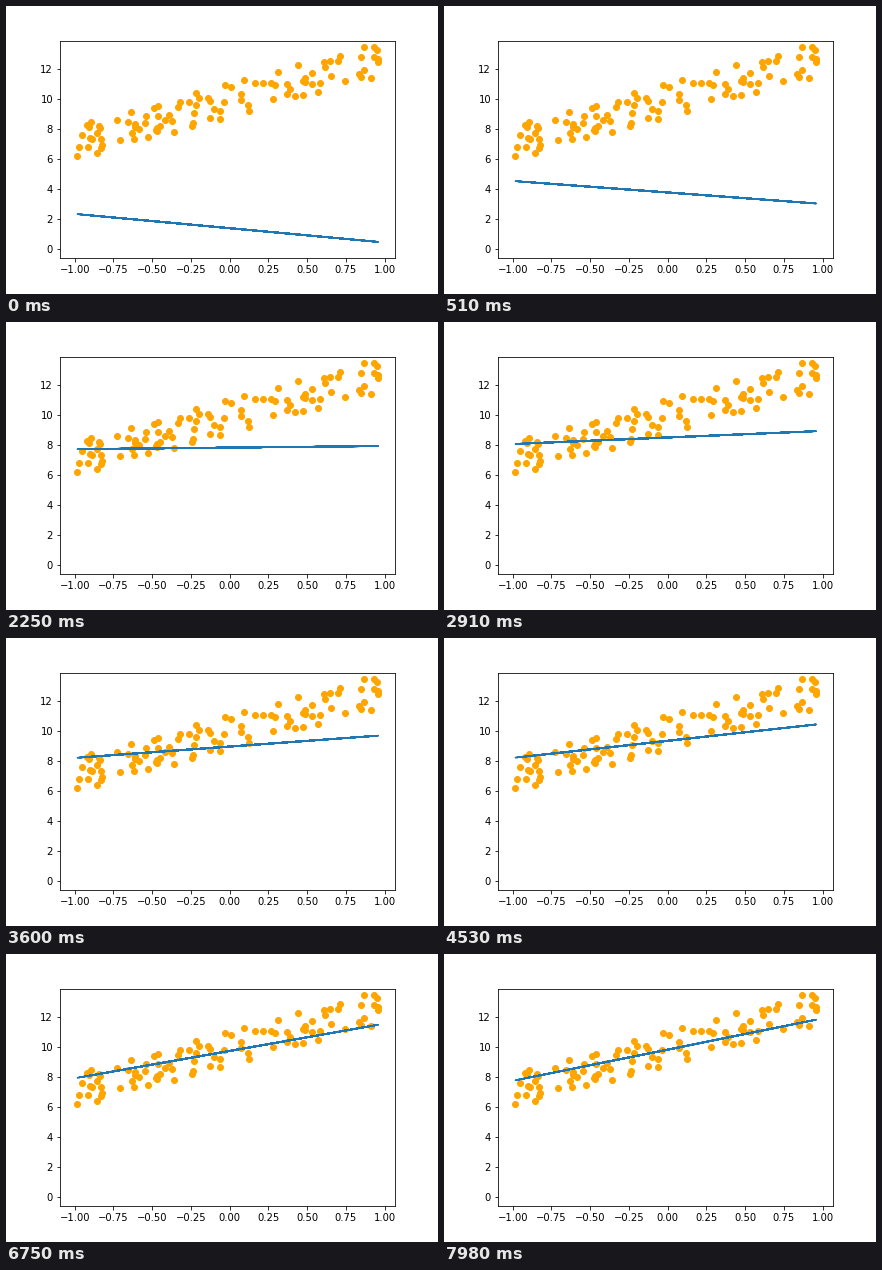
A matplotlib script that plays this animation: 432 px wide and 288 px high, repeating every 8 s.

```python
import numpy as np
import matplotlib.pyplot as plt
from matplotlib.animation import FuncAnimation

WIDTH, HEIGHT, DPI = 432, 288, 72
X0, Y0 = 223.7, 242.6        # stage position of the data origin
X_UNIT, Y_UNIT = 155, 15     # pixels per data unit
FRAMES, INTERVAL = 400, 20

# Clumps of samples along x: from, to, count
CLUMPS = [(-0.983, -0.824, 16), (-0.73, -0.198, 32), (-0.137, 0.01, 9),
          (0.07, 0.16, 6), (0.218, 0.747, 25), (0.837, 0.959, 11)]
SPREAD = 1.1

# Gradient descent on the mean squared error of y = w * x + b
RATE = 0.02
CURVATURE = np.array([[1, -0.11], [-0.11, 0.362]])
BEST = np.array([9.97, 2.9])
START = np.array([1.36, -0.953])


def make_samples(rng):
    """Noisy samples around a rising straight trend."""
    xs, noise = [], []
    for lo, hi, n in CLUMPS:
        xs += [lo, hi, *rng.uniform(lo, hi, n - 2)]
        noise += list(rng.permutation(np.linspace(-SPREAD, SPREAD, n)))
    xs = np.array(xs)
    return xs, 9.9 + 2.85 * xs + noise


def fit(step):
    """Bias and weight after a number of descent steps."""
    decay = np.linalg.matrix_power(np.eye(2) - RATE * CURVATURE, step)
    return BEST + decay @ (START - BEST)


rng = np.random.default_rng(4)
xs, ys = make_samples(rng)
line_x = rng.permutation(xs)   # unordered, so the line doubles back on itself

fig = plt.figure(figsize=(WIDTH / DPI, HEIGHT / DPI), dpi=DPI, facecolor="white")
fig.subplots_adjust(left=0.125, right=0.9, bottom=0.125, top=0.88)
ax = fig.add_subplot()
ax.scatter(xs, ys, color="orange")
line, = ax.plot(line_x, line_x, color="tab:blue")

box = ax.get_position()
ax.set_xlim((box.x0 * WIDTH - X0) / X_UNIT, (box.x1 * WIDTH - X0) / X_UNIT)
ax.set_ylim((Y0 - (1 - box.y0) * HEIGHT) / Y_UNIT,
            (Y0 - (1 - box.y1) * HEIGHT) / Y_UNIT)
ax.set_xticks(np.arange(-1, 1.01, 0.25))
ax.set_yticks(range(0, 13, 2))


def update(i):
    b, w = fit((2 * i + 1) // 3)   # one step every 30 ms
    line.set_ydata(w * line_x + b)
    return line,


def init():
    return update(0)


anim = FuncAnimation(fig, update, frames=FRAMES, init_func=init,
                     interval=INTERVAL, repeat=True, repeat_delay=0)
plt.show()
```
